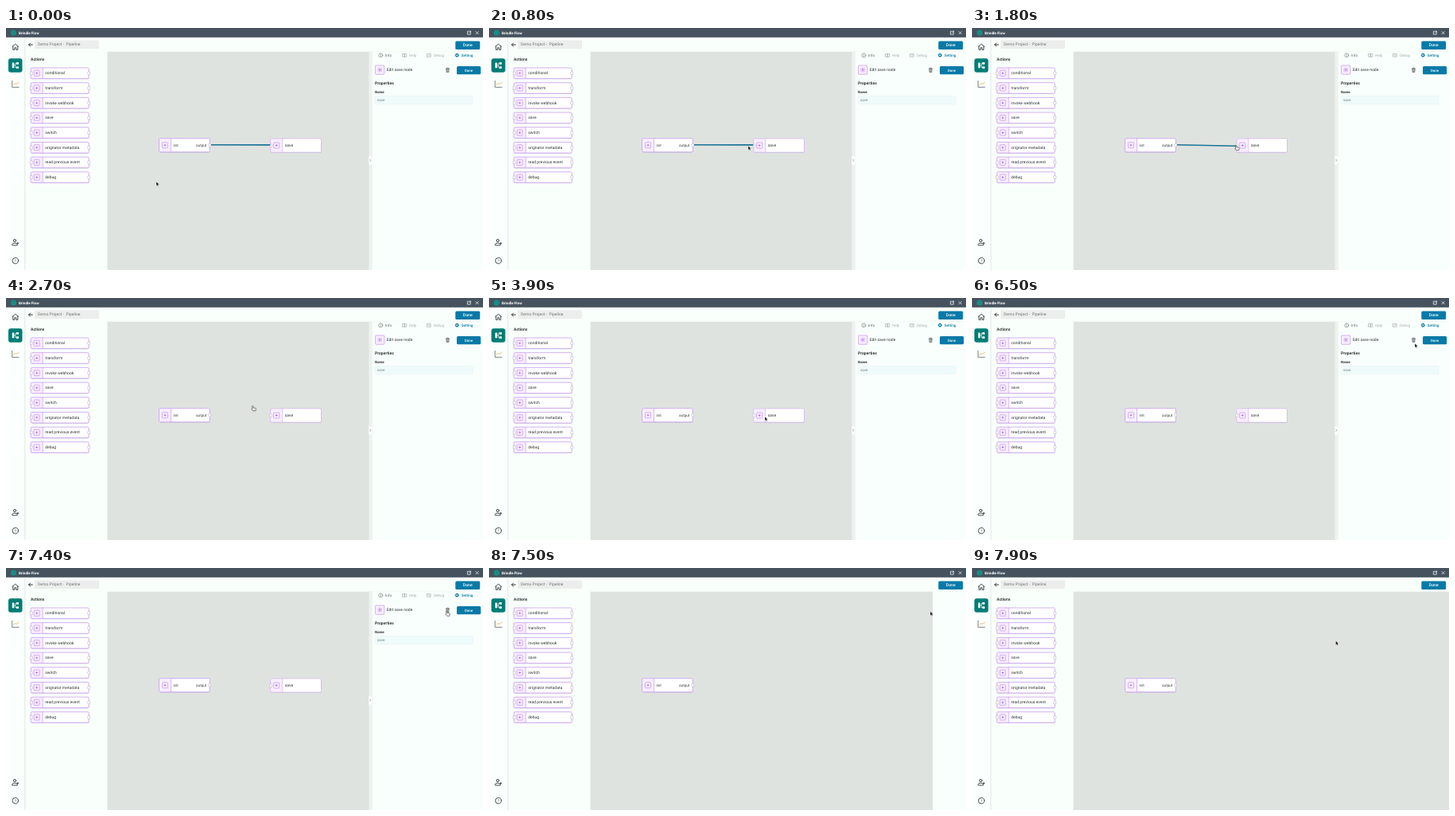
Write an HTML page that moves like this. It is 600 px wide and 304 px high and loops after 8 s.

```html
<!DOCTYPE html>
<html lang="en">
<head>
<meta charset="utf-8">
<title>Pipeline editor</title>
<style>
  html, body { margin: 0; width: 100%; height: 100%; overflow: hidden; background: #f9fffb; }
  svg { display: block; width: 600px; height: 304px; }
  text { font: 5.05px Roboto, Arial, sans-serif; fill: #303536; text-rendering: geometricPrecision; }
  .small { font-size: 4.6px; }
  .bold { font-weight: 700; }
  .line { fill: none; stroke: #343b3d; stroke-width: .7; stroke-linecap: round; stroke-linejoin: round; }
</style>
</head>
<body>
<svg id="stage" viewBox="0 0 600 304"></svg>
<script>
const PURPLE = '#c99cf0', BLUE = '#087aa8', TEAL = '#007d75';

const rect = (x, y, w, h, fill, more = '') =>
  `<rect x="${x}" y="${y}" width="${w}" height="${h}" fill="${fill}" ${more}/>`;
const label = (x, y, text, more = '') => `<text x="${x}" y="${y}" ${more}>${text}</text>`;
const line = (d, more = '') => `<path class="line" d="${d}" ${more}/>`;
const circle = (x, y, r, more = '') => `<circle class="line" cx="${x}" cy="${y}" r="${r}" ${more}/>`;
const stroke = color => `style="stroke:${color}"`;

const plusBox = (x, y, r) =>
  rect(x - r, y - r, 2 * r, 2 * r, '#f8efff', `rx=".8" stroke="${PURPLE}" stroke-width=".8"`) +
  line(`M${x - 1.1} ${y}h2.2M${x} ${y - 1.1}v2.2`, stroke('#a45ce0'));

const port = (x, y) => rect(x - 1.4, y - 1.9, 2.8, 3.8, '#fff', 'rx=".7" stroke="#b9b2c0" stroke-width=".6"');

function node(x, y, w, h, name, { inlet = true, outlet = true, color = PURPLE, size = '' } = {}) {
  const mid = y + h / 2;
  return rect(x + .2, y + .7, w, h, '#8d7a9c', 'rx="1.8" opacity=".35"') +
    rect(x, y, w, h, '#fff', 'rx="1.6"') +
    rect(x, y, 15, h, '#f7eeff', 'rx="1.6"') +
    line(`M${x + 15} ${y}v${h}`, stroke(color)) +
    rect(x, y, w, h, 'none', `rx="1.6" stroke="${color}" stroke-width=".8"`) +
    plusBox(x + 7.5, mid, 3.5) +
    label(x + 18, mid + 1.5, name, size) +
    (inlet ? port(x + .5, mid) : '') + (outlet ? port(x + w, mid) : '');
}

const button = (x, y, w, h, size) =>
  rect(x, y, w, h, BLUE, 'rx="1.5"') +
  label(x + w / 2, y + h / 2 + 1.6, 'Done', `text-anchor="middle" style="fill:#fff;font-weight:500;font-size:${size}px"`);

function topBar() {
  return rect(0, 0, 600, 11.8, '#46535f') +
    `<circle cx="9.5" cy="6" r="3.6" fill="#168d84"/>` +
    label(16, 7.8, 'Brindle Flow', 'class="small bold" style="fill:#fff"') +
    line('M582 4.2h-1.6v3.9h3.9v-1.7M582.5 6l1.9-1.9M583 4h1.5v1.5', stroke('#fff')) +
    line('M591 4.5l3.2 3.2M594.2 4.5l-3.2 3.2', stroke('#fff'));
}

function sideBar() {
  return rect(0, 12, 24, 292, '#fbfffd') + rect(23.3, 12, 1, 292, '#e2e9e5') +
    line('M8 23.4l3.8-3.2 3.8 3.2M8.8 22.9v4.5h2v-2.6h2v2.6h2v-4.5', 'style="stroke-width:.9"') +
    rect(3, 38.3, 17.5, 17.4, TEAL, 'rx="3"') +
    line('M9.8 47h2v-2.7h1.4M11.8 47v2.7h1.4', stroke('#fff')) +
    rect(7.8, 43.6, 2.4, 6.6, '#fff', 'rx=".5"') +
    rect(13, 43.1, 3, 2.7, '#fff', 'rx=".5"') + rect(13, 48.2, 3, 2.7, '#fff', 'rx=".5"') +
    line('M7.7 66.4v8h8.4', stroke('#4b5356')) +
    line('M9 71.6l2.1-2.1 1.9 1 3.2-2.3', stroke('#dda33a')) +
    circle(11, 267, 1.6, 'style="stroke-width:.9"') +
    line('M7.8 272.6v-.8q0-1.7 3.2-1.7t3.2 1.7v.8zM13.9 270.4h1.8M14.8 269.5v1.8', 'style="stroke-width:.9"') +
    circle(11.8, 292.3, 3.7, 'style="stroke-width:.9"') +
    label(11.8, 294, '?', 'text-anchor="middle" class="small"');
}

function actions() {
  const names = ['conditional', 'transform', 'invoke webhook', 'save', 'switch',
    'orignator metadata', 'read previous event', 'debug'];
  return rect(24.3, 29.5, 103, 274.5, '#f9fffb') +
    label(31, 41.2, 'Actions', 'class="bold"') +
    names.map((name, i) => node(31.2, 50 + i * 18.68, 73, 13.6, name)).join('');
}

function header() {
  return rect(24.3, 11.8, 576, 17.7, '#f9fffb') +
    line('M33.4 21h-4.8M30.6 19l-2 2 2 2', 'style="stroke:#222;stroke-width:.9"') +
    rect(36, 15.4, 81, 10.6, '#ebeeec', 'rx="1"') +
    label(40, 22.3, 'Demo Project -&#160; Pipeline', 'style="fill:#6d7372"') +
    button(565.3, 16.4, 30.9, 10.6, 5.1);
}

function settings() {
  const tab = (x, name, color) => label(x, 36, name, `class="small" style="fill:${color}"`);
  const gray = '#a6adab';
  return rect(456.5, 29.5, 4, 274.5, '#edf2ef') +
    rect(456.3, 161, 4, 10.5, '#fbfffd', 'rx="1"') +
    line('M457.8 165l1 1.2-1 1.2', 'style="stroke:#6c7473;stroke-width:.6"') +
    circle(471.3, 34.3, 2.5, 'style="stroke:#6c7473;stroke-width:.6"') +
    line('M471.3 34.2v1.3M471.3 33v.1', 'style="stroke:#6c7473;stroke-width:.6"') + tab(477, 'Info', '#5c6463') +
    line('M499 32.4h2.4v3.8H499zM501.4 32.4h2.4v3.8h-2.4z', stroke(gray)) + tab(507, 'Help', gray) +
    line('M529.8 32.4h4.4v3.8h-4.4zM531 34.2h2', stroke(gray)) + tab(538, 'Debug', gray) +
    `<circle cx="567.3" cy="34.2" r="1.5" fill="none" stroke="${BLUE}" stroke-width="1.2"/>` +
    `<circle cx="567.3" cy="34.2" r="2.3" fill="none" stroke="${BLUE}" stroke-width=".7" stroke-dasharray="1 .8"/>` +
    label(572.8, 36, 'Setting', `class="small" style="fill:${BLUE};font-weight:500"`) +
    plusBox(470.2, 52.6, 5.6) +
    rect(468, 50.4, 4.4, 4.4, 'none', `rx=".4" stroke="${PURPLE}" stroke-width=".6"`) +
    label(478.7, 54, 'Edit save node') +
    line('M553.4 51.2h4.2M554.6 51v-.8h1.8V51M553.9 51.4l.2 4.2h2.8l.2-4.2M555 52.6v1.9M556 52.6v1.9', 'style="stroke-width:.6"') +
    button(567, 48, 30.2, 10.2, 4.4) +
    label(464, 71.4, 'Properties', 'class="bold"') +
    label(464, 81.5, 'Name', 'class="bold" style="font-size:4.45px"') +
    rect(464.4, 85.5, 122.7, 10, '#effbfb', 'rx=".8" stroke="#e2eff0" stroke-width=".5"') +
    label(467, 91.9, 'save', 'class="small" style="fill:#727b7b"');
}

const arrow = `<path d="M0 0v5.2l1.2-1 .8 1.8 1-.4-.8-1.8h1.7z" fill="#111" stroke="#fff" stroke-width=".4"/>`;
const hand = `<path transform="translate(-1.4 -.5)" d="M.6 0q.9 0 .9 1v1.4l2.6.5q.7.2.6 1l-.4 2.4H1.1L-.6 4.2q.1-.8.9-.4L0 .8Q0 0 .6 0z" fill="#fff" stroke="#222" stroke-width=".6"/>`;

const stage = document.getElementById('stage');
stage.innerHTML =
  rect(127.3, 29.5, 473, 275, '#dfe3e0') +
  node(192.5, 138.6, 63.8, 17.2, 'init', { inlet: false, size: 'class="small"' }) +
  label(239, 148.5, 'output', 'class="small"') +
  `<g id="save">${node(332.7, 138.8, 63.8, 17.4, 'save', { outlet: false, color: '#d3b4ee' })}</g>` +
  `<path id="edge" fill="none" stroke="#1b7397" stroke-width="1.6"/>` +
  header() + actions() + sideBar() +
  `<g id="panel">${rect(460.3, 29.5, 140, 275, '#f9fffc')}<g id="settings">${settings()}</g></g>` +
  topBar() +
  `<g id="cursor"><g id="arrow">${arrow}</g><g id="hand">${hand}</g></g>`;

const part = Object.fromEntries([...stage.querySelectorAll('[id]')].map(el => [el.id, el]));
const show = (el, on) => el.setAttribute('visibility', on ? 'visible' : 'hidden');

// Pointer path: time in ms, x, y
const path = [
  [0, 189, 193], [100, 229, 184], [200, 287, 174], [300, 303, 177], [400, 303, 177],
  [700, 318, 158], [800, 326, 148], [900, 321, 147], [1000, 321, 147], [1300, 331.5, 147],
  [1700, 331.5, 147], [1800, 332.8, 147.8], [2000, 328, 144], [2300, 311, 136], [3200, 311, 136],
  [3500, 325, 141], [3800, 347, 151], [3900, 347, 149], [5600, 347, 149], [5700, 432, 122.3],
  [5800, 468, 108], [5900, 475, 105], [6000, 475, 105], [6300, 530, 70], [6500, 557, 57],
  [6700, 555.3, 54.5], [7500, 555, 54.5], [7600, 554, 56], [7800, 548, 65], [7900, 457.5, 91.5]
];

function pointerAt(t) {
  const next = path.findIndex(p => p[0] > t);
  if (next < 0) return path[path.length - 1].slice(1);
  const [t0, x0, y0] = path[next - 1], [t1, x1, y1] = path[next];
  const k = (t - t0) / (t1 - t0);
  return [x0 + (x1 - x0) * k, y0 + (y1 - y0) * k];
}

function draw(now) {
  const t = Math.floor(now % 8000 / 100) * 100;
  const [x, y] = pointerAt(t);
  const pointing = (t >= 1500 && t < 2900) || (t >= 7000 && t < 7500);
  const deleted = t >= 7500;

  part.cursor.setAttribute('transform', `translate(${x} ${y})`);
  show(part.arrow, !pointing);
  show(part.hand, pointing);

  const end = t < 1800 ? [332.5, 146.9] : [x, y + .4];
  part.edge.setAttribute('d', `M258 146.8L${end}`);
  show(part.edge, t < 2700);

  show(part.save, !deleted);
  show(part.settings, !deleted);
  part.panel.setAttribute('transform', `translate(${!deleted ? 0 : t < 7600 ? 98 : 140} 0)`);
}

const start = performance.now();
function tick() {
  draw(performance.now() - start);
  requestAnimationFrame(tick);
}
tick();
</script>
</body>
</html>
```
